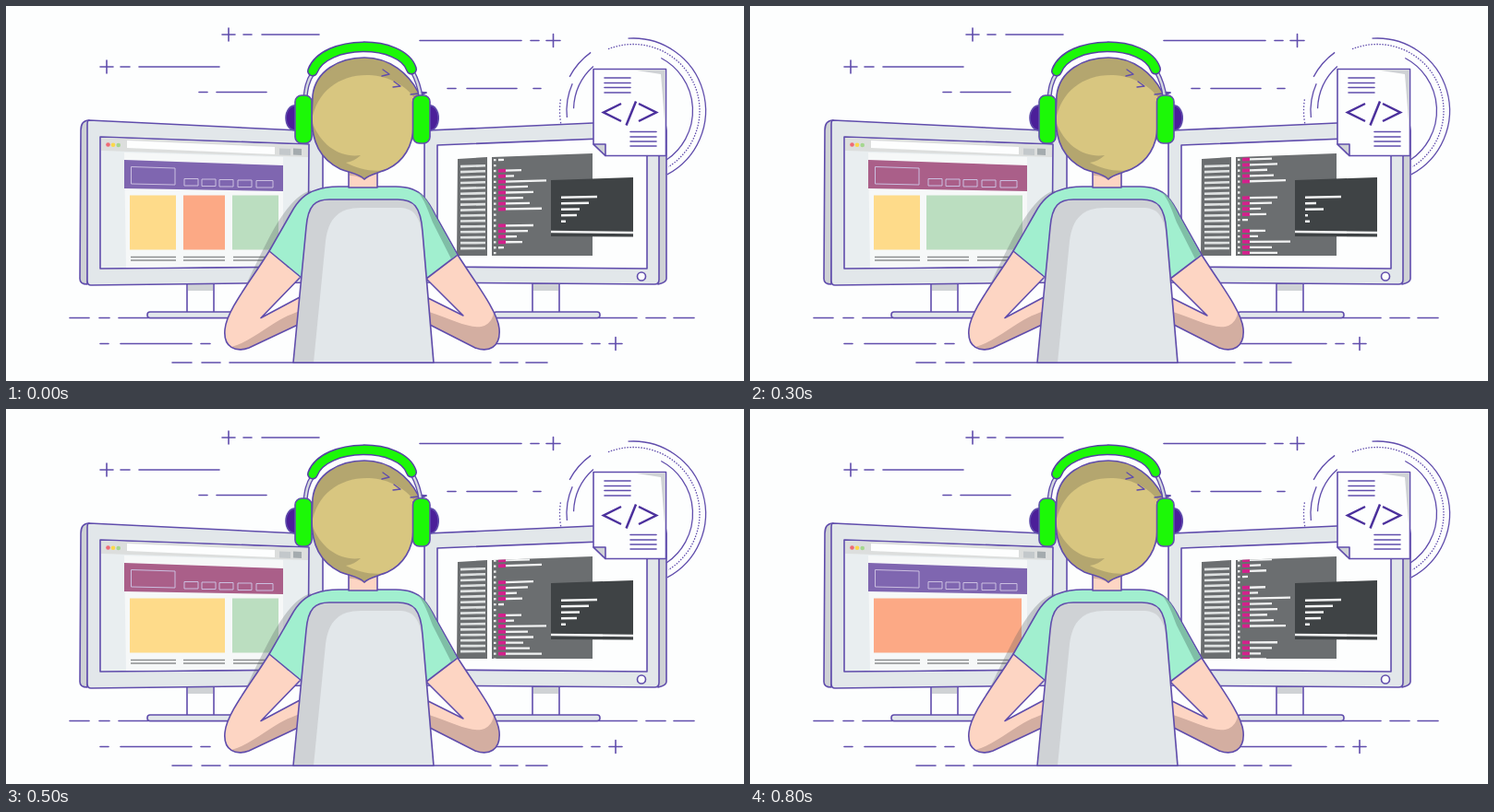
Write an HTML page that moves like this. It is 799 px wide and 407 px high and loops after 0.9 s.

```html
<!DOCTYPE html>
<html lang="en">
<head>
<meta charset="utf-8">
<title>Developer at work</title>
<style>
  html, body { margin: 0; width: 100%; height: 100%; overflow: hidden; background: #fdfefe; }
  svg { display: block; width: 100vw; height: 100vh; }
  .ink { stroke: #604dac; stroke-width: 1.6; stroke-linejoin: round; stroke-linecap: round; }
  .line { fill: none; }
  .white { fill: #fdfefe; }
  .metal { fill: #e2e7ea; }
  .gray { fill: #cfd2d5; }
  .skin { fill: #fdd5c3; }
  .skin-shade { fill: #d3aea1; }
  .green { fill: #1cf807; }
</style>
</head>
<body>
<svg viewBox="0 0 799 407">
  <defs>
    <clipPath id="editor"><path d="M526 164L635 160V271H526Z"/></clipPath>
    <clipPath id="head"><path id="headShape" d="M332 97C335 71 360 56 388 56C416 56 436 74 446 93L455 94L441 101V130C441 152 430 169 413 177C404 181 392 183 388 188C383 182 372 181 362 177C340 166 331 148 331 120Z"/></clipPath>
    <path id="headphoneArms" fill="none" d="M332 73C326 82 325 90 324 99M440 71C446 82 448 90 449 99"/>
    <path id="headband" fill="none" stroke-linecap="round" d="M332 70.500C345 36 428 36 439 68.500"/>
  </defs>

  <!-- Background strokes -->
  <path class="ink line" d="M234 31h14m-7-7v14M257 31h9M277 31h62M102 66h14m-7-7v14M124 66h10M144 66h87M209 93.500h9M228 93.500h54
    M448 37.500h110M568 37.500h9M585 37.500h15m-7.500-7v14M478 89.500h9M499 89.500h54M571 89.500h8
    M69 338.500h21M101 338.500h11M122 338.500h561M693 338.500h21M723 338.500h22
    M102 366.500h9M124 366.500h77M211 366.500h10M525 366.500h99M634 366.500h9M653 366.500h14m-7-7v14
    M180 387h21M212 387h20M242 387h283M535 387h19M563 387h23"/>
  <g id="rings" class="line ink" style="stroke-width:1.3;stroke-linecap:butt"></g>

  <!-- Left monitor -->
  <path class="ink white" d="M196 301h29v32h-29z"/>
  <path class="gray" d="M197 302h27v7h-27z"/>
  <rect class="ink metal" x="153" y="332" width="115" height="6.500" rx="3"/>
  <path class="ink gray" d="M90 124Q81 124 81 135L80 296Q80 302 88 302Z"/>
  <path class="ink metal" d="M90 124L338 136Q343 136 343 141V300L92 303Q88 303 88 298V129Q88 124 90 124Z"/>
  <path class="ink" fill="#e9eef0" d="M102 142L328 150L327 283L102 285Z"/>
  <path fill="#f6f8f8" d="M128 159L300 164V282L130 284Z"/>
  <path fill="#dcdedd" d="M103 143L327 151V164L103 157Z"/>
  <path class="white" d="M131 146L291 153V161L131 154Z"/>
  <path fill="#c3c8cb" d="M296 154.500l12 .5v7l-12-.5z"/>
  <path fill="#a4abae" d="M311 154.500l9 .5v7l-9-.5z"/>
  <circle cx="110.500" cy="150.500" r="2.300" fill="#ef6a75"/>
  <circle cx="116" cy="150.700" r="2.300" fill="#fbd84b"/>
  <circle cx="121.700" cy="151" r="2.300" fill="#a5d78f"/>
  <path id="banner" d="M128 167L300 173V201L128 198Z"/>
  <path fill="none" stroke="#cbbfe0" d="M135.500 174.500L183 176V194L135.500 193ZM193 187.500h15v7.500h-15zM212 188h15v7.500h-15zM231 188.500h15v7.500h-15zM251 189h15v7.500h-15zM271 189.500h18v7.500h-18z"/>
  <g id="cards"></g>
  <path stroke="#8c8f90" stroke-width="1.600" d="M135 272.500h49M135 276h49M192 272.500h45M192 276h45M246 272.500h49M246 276h49"/>
  <path fill="#50555a" fill-opacity=".27" d="M330 200C304 208 285 250 261 300L300 300L330 210Z"/>

  <!-- Right monitor -->
  <path class="ink white" d="M570 301h29v32h-29z"/>
  <path class="gray" d="M571 302h27v7h-27z"/>
  <rect class="ink metal" x="528" y="332" width="115" height="6.500" rx="3"/>
  <path class="ink gray" d="M706 124Q715 125 715 135V296Q715 300 706 302Z"/>
  <path class="ink metal" d="M457 135L702 124Q707 124 707 130V297Q707 302 702 302L453 300V140Q453 135 457 135Z"/>
  <path class="ink white" d="M467 151L694 142V285L467 283Z"/>
  <circle class="ink white" cx="688" cy="293.500" r="4.500"/>
  <path fill="#6b6e70" d="M489 166L521 164V271L488 271ZM526 164L635 160V271H526Z"/>
  <path id="sidebar" stroke="#dfe2e2" stroke-width="2.600"/>
  <g clip-path="url(#editor)" stroke-width="2.300">
    <path id="keywords" stroke="#d3218c" stroke-width="3.800"/>
    <path id="code" stroke="#f2f3f3"/>
  </g>
  <path fill="#3f4345" d="M590 189L679 186V250.500L590 250Z"/>
  <path stroke="#f2f3f3" stroke-width="2.600" d="M590 245L679 246"/>
  <path id="terminal" stroke="#f2f3f3" stroke-width="2.500"/>

  <!-- Document -->
  <path class="ink white" d="M636 68.500H714.500V162.500H649L636 150Z"/>
  <path class="gray" d="M680 69.500H713.500V130L709 74Z"/>
  <path class="ink gray" d="M636 150H649V162.500Z"/>
  <path class="ink line" d="M648 78h28M648 83.500h28M648 88.500h28M648 94h28M676 136.500h28M676 142h28M676 147h28M676 152h28"/>
  <path class="line" stroke="#4b309c" stroke-width="2.500" d="M666 106L647 115.500L666 125M682 103.500L671.500 129.500M685 106L704 115.500L685 125"/>

  <!-- Arms and shirt -->
  <path class="skin" d="M285 266C264 300 239 330 237 351C235 371 249 376 263 371L318 345L320 315L276 338.500L318 295Z"/>
  <path class="skin-shade" d="M244 370C270 363 288 340 319 331L317 345L263 371C255 374 249 373 244 370Z"/>
  <path class="ink line" d="M285 266C264 300 239 330 237 351C235 371 249 376 263 371L318 345M320 315L276 338.500L318 295"/>
  <path class="skin" d="M489 270C505 296 532 330 534 350C536 371 522 376 508 371L459 346L457 317L495 336L455 296Z"/>
  <path class="skin-shade" d="M458 332C485 341 505 352 518 347C524 344 527 339 528 333C532 341 534 347 534 352C535 371 522 376 508 371L459 346Z"/>
  <path class="ink line" d="M489 270C505 296 532 330 534 350C536 371 522 376 508 371L459 346M457 317L495 336L455 296"/>
  <path class="ink" fill="#a1efcf" d="M285 266L309 224C316 211 325 203 335 200C343 197 350 196 360 196H422C435 196 445 199 452 207C458 213 462 221 466 229L489 270L455 296L320 295Z"/>
  <path fill="#7fbea6" d="M446 202C457 209 461 221 465.500 229L488 270L482 274.500L462 235C457 222 453 210 446 202Z"/>
  <path class="ink skin" d="M371 178V197H402V178Z"/>
  <path class="skin-shade" d="M372 179H401L388 189C382 185 377 184 372 184Z"/>

  <!-- Chair -->
  <path class="gray" d="M311 387L325 240C327 216 335 210 350 210H424C441 210 449 217 451 245L463 387Z"/>
  <path class="metal" d="M333 387L346 255C349 230 361 219 384 219H425C440 219 447 226 450 246L462 387Z"/>
  <path class="ink line" d="M311 387L325 240C327 216 335 210 350 210H424C441 210 449 217 451 245L463 387Z"/>

  <!-- Head -->
  <g clip-path="url(#head)">
    <path fill="#b4a66f" d="M325 50h140v145h-140z"/>
    <path fill="#d8c680" d="M331 125C336 92 362 74 393 75C415 76 434 87 442 100V130C441 152 430 168 412 177C402 181 383 178 368 170C374 169 380 166 384 162C362 165 341 152 331 125Z"/>
  </g>
  <use href="#headShape" class="ink line"/>
  <path class="ink line" style="stroke-width:1.300" d="M408 69L415 74L407 76M420 82L427 87L419 88M438 96L455 94"/>

  <!-- Headphones -->
  <use href="#headphoneArms" stroke="#604dac" stroke-width="5"/>
  <use href="#headphoneArms" stroke="#d5d9df" stroke-width="2.400"/>
  <use href="#headband" stroke="#5540a3" stroke-width="12"/>
  <use href="#headband" stroke="#1cf807" stroke-width="9"/>
  <path class="ink" fill="#4b1f99" d="M315 108C299 106 299 137 315 135ZM457 108C472 106 472 137 457 135Z"/>
  <rect class="ink green" x="313" y="97" width="18" height="52" rx="7"/>
  <rect class="ink green" x="440.500" y="97" width="18.500" height="52" rx="7"/>
</svg>
<script>
const STEP = 100, STEPS = 9, SCROLL = 10, PERIOD = 95;
const $ = id => document.getElementById(id);

// Right end of each code line; 0 is an empty line, short lines have no keyword
const codeEnds = [585, 565, 571, 560, 567, 580, 0, 0, 571, 565, 553, 559, 539, 0, 558, 550];

const prompts = { a: [39, 30, 20, 17, 5], b: [39, 12, 20, 3, 5], c: [12, 30, 3, 25, 5] };
const promptOrder = 'aabbaacca';

const YELLOW = '#fedb8a', ORANGE = '#fca985', GREEN = '#bbdec0';
const PURPLE = '#7f66b0', PINK = '#aa5f89';
const pages = [
  { banner: PURPLE, cards: [[134, 184, YELLOW], [192, 237, ORANGE], [245, 295, GREEN]] },
  { banner: PINK, cards: [[134, 184, YELLOW], [191, 295, GREEN]] },
  { banner: PINK, cards: [[134, 237, YELLOW], [245, 295, GREEN]] },
  { banner: PURPLE, cards: [[134, 294, ORANGE]] }
];
const pageOrder = [0, 0, 0, 1, 1, 2, 2, 3, 3];

// Lines near the top of the screen lean upwards with its perspective
const lean = y => -0.037 * (271 - y) / 107;
function bar(x1, x2, y) {
  const slope = lean(y);
  return `M${x1} ${y + (x1 - 526) * slope}L${x2} ${y + (x2 - 526) * slope}`;
}

// Arc around the document, angles in degrees clockwise from the right
function arc(radius, from, to, dash = 'none') {
  const point = degrees => {
    const angle = degrees * Math.PI / 180;
    return `${679 + radius * Math.cos(angle)} ${113.5 + radius * Math.sin(angle)}`;
  };
  return `<path stroke-dasharray="${dash}" d="M${point(from)}A${radius} ${radius} 0 0 1 ${point(to)}"/>`;
}

function drawCode(step) {
  const pitch = PERIOD / codeEnds.length;
  let code = '', keywords = '';
  for (let i = -16; i < 32; i++) {
    const y = 191 + i * pitch - step * SCROLL;
    if (y < 158 || y > 276) continue;
    const end = codeEnds[(i + 16) % 16];
    code += bar(528, 530.5, y);
    if (end > 540) keywords += bar(533, 541, y);
    if (end) code += bar(end > 540 ? 541 : 533, end, y);
  }
  $('code').setAttribute('d', code);
  $('keywords').setAttribute('d', keywords);
}

function drawPage({ banner, cards }) {
  $('banner').setAttribute('fill', banner);
  $('cards').innerHTML = cards.map(([left, right, color]) =>
    `<path fill="${color}" d="M${left} 205.5H${right}V264.500H${left}Z"/>`).join('');
}

function draw(step) {
  drawCode(step);
  drawPage(pages[pageOrder[step]]);
  $('terminal').setAttribute('d', prompts[promptOrder[step]]
    .map((width, i) => `M601 ${207.8 + i * 6.5}l${width} ${-width * 0.02}`).join(''));
}

$('sidebar').setAttribute('d', Array.from({ length: 16 }, (_, i) => bar(492, 519, 173 + i * 6)).join(''));
$('rings').innerHTML = arc(78.5, -94, 62) + arc(72, -112, 58, '1.5 1.5') + arc(64.5, -62, 56)
  + arc(79.5, 170, 190, '1.5 2') + arc(78, 208, 234) + arc(72, 174, 204) + arc(64.5, 182, 228);

let shown = -1;
function tick() {
  const step = Math.floor(performance.now() / STEP) % STEPS;
  if (step !== shown) draw(shown = step);
  requestAnimationFrame(tick);
}
tick();
</script>
</body>
</html>
```
